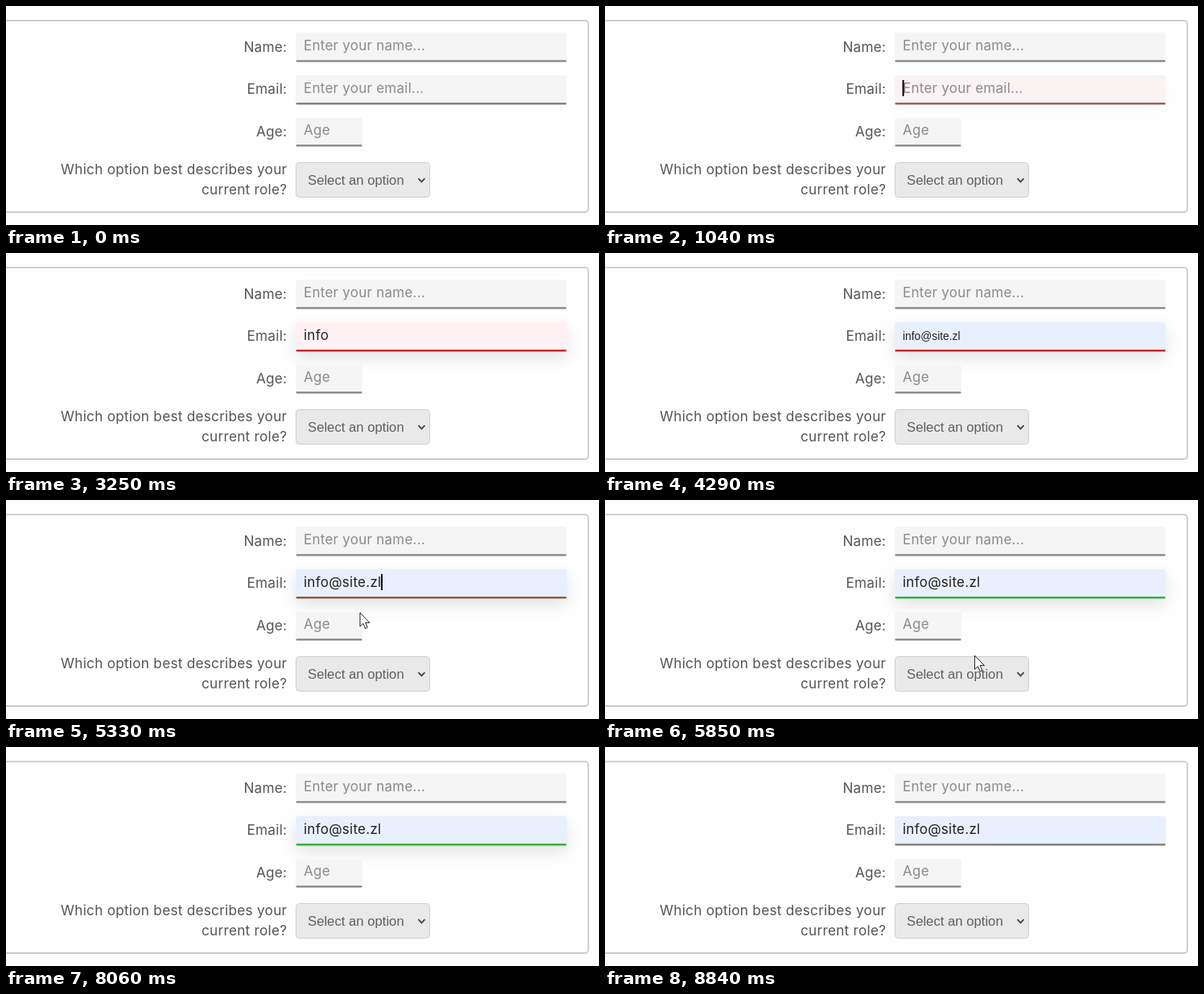
Write an HTML page that moves like this. It is 737x272 px and loops after 8.97 s.

```html
<!DOCTYPE html>
<html lang="en">
<head>
<meta charset="utf-8">
<title>Form validation</title>
<style>
  html, body { margin: 0; width: 100%; height: 100%; overflow: hidden; background: #fefefe; }
  svg { position: absolute; left: 0; top: 0; }
  text { font: 17px Montserrat, Inter, sans-serif; letter-spacing: .015em; fill: #555; }
  .field { fill: #f5f5f5; }
  .line { fill: #848484; }
  .label { font-size: 17.2px; text-anchor: end; }
  .hint { fill: #8a8a8a; }
  .system { font: 16.7px "Liberation Sans", Arial, sans-serif; letter-spacing: 0; fill: #606060; }
  #value { fill: #222; }
  #value.system { font-size: 13.8px; }
</style>
</head>
<body>
<svg width="737" height="272">
  <rect x="-10" y="18.2" width="733.7" height="237.8" rx="4" fill="none" stroke="#cacaca" stroke-width="1.8"/>

  <rect class="field" x="360" y="33" width="337" height="36.4" rx="3"/>
  <rect class="line" x="360.5" y="67.2" width="336" height="2.2" rx="1"/>
  <rect class="field" id="email" x="360" y="86" width="337" height="36.4" rx="3"/>
  <rect class="line" id="emailLine" x="360.5" y="119.9" width="336" height="2.5" rx="1"/>
  <rect class="field" x="360" y="139" width="83" height="35.4" rx="3"/>
  <rect class="line" x="360.5" y="172.2" width="82" height="2.2" rx="1"/>
  <rect x="360.5" y="194.5" width="166" height="43" rx="4" fill="#e9e9e9" stroke="#cfcfcf"/>
  <path d="M512.5 214.2l4 4.2 4-4.2" fill="none" stroke="#444" stroke-width="1.8"/>

  <text class="label" x="349.3" y="57">Name:</text>
  <text class="label" x="349.3" y="109">Email:</text>
  <text class="label" x="349.3" y="162">Age:</text>
  <text class="label" x="349.3" y="209">Which option best describes your</text>
  <text class="label" x="349.3" y="234">current role?</text>
  <text class="hint" x="370" y="55">Enter your name...</text>
  <text class="hint" id="emailHint" x="370" y="108">Enter your email...</text>
  <text class="hint" x="370" y="160">Age</text>
  <text class="system" x="375" y="222">Select an option</text>
  <text id="value" x="370" y="108"></text>
  <rect id="caret" y="92" width="2" height="20"/>
  <path id="pointer" d="M0 0V17L4 13.5 6.6 19.7 9.3 18.5 6.7 12.4H12Z" fill="#fff" stroke="#222"/>
</svg>
<script>
const LOOP = 8970, STEP = 130, FADE = 300;
const ADDRESS = "info@site.zl";
const KEY_TIMES = [1950, 2210, 2470, 2600];
const FOCUS = 1040, PREVIEW = 4030, ACCEPT = 5330, BLUR = 8840;
const CARET_ON = [[FOCUS, 1560], [1950, 3250], [3770, PREVIEW], [ACCEPT, 5850],
                  [6370, 6890], [7540, 8060], [8580, BLUR]];
// Pointer paths: time, x, y
const PATHS = [
  [[260, 484, 212], [520, 452, 128]],
  [[ACCEPT, 440, 140], [5850, 459.5, 193.2], [5980, 466, 222]]
];
const GRAY = [132, 132, 132], RED = [203, 42, 48], GREEN = [54, 176, 60];
const PLAIN = [245, 245, 245], PINK = [255, 241, 243], BLUE = [232, 240, 254];

const [email, emailLine, emailHint, value, caret, pointer] =
  ["email", "emailLine", "emailHint", "value", "caret", "pointer"].map(id => document.getElementById(id));

const mix = (a, b, p) => a.map((v, i) => v + (b[i] - v) * p);
const rgb = c => `rgb(${c.map(Math.round)})`;
const show = (el, on) => el.style.display = on ? "" : "none";
// Each transition begins shortly before its first visible step.
const fade = (t, start) => Math.min(1, Math.max(0, (t - start + 120) / FADE));

function pointerAt(t) {
  const path = PATHS.find(p => t >= p[0][0] && t <= p[p.length - 1][0]);
  if (!path) return null;
  const i = Math.max(1, path.findIndex(k => k[0] >= t));
  const [a, b] = [path[i - 1], path[i]];
  return mix(a, b, (t - a[0]) / (b[0] - a[0])).slice(1);
}

function drawField(t) {
  const focused = t < BLUR ? fade(t, FOCUS) : 0;
  const status = mix(RED, GREEN, fade(t, ACCEPT));
  const fill = mix(mix(PLAIN, PINK, fade(t, FOCUS)), BLUE, fade(t, PREVIEW));
  email.style.fill = rgb(fill);
  email.style.filter = focused ? `drop-shadow(0 8px 10px rgba(0,0,0,${.1 * focused ** 2}))` : "none";
  emailLine.style.fill = rgb(mix(GRAY, status, focused));
}

function drawText(t) {
  const typed = t >= PREVIEW ? ADDRESS.length : KEY_TIMES.filter(k => t >= k).length;
  value.textContent = ADDRESS.slice(0, typed);
  value.classList.toggle("system", t >= PREVIEW && t < ACCEPT);
  show(emailHint, !typed);
  show(caret, CARET_ON.some(([from, to]) => t >= from && t < to));
  caret.setAttribute("x", 369.6 + (typed ? value.getComputedTextLength() : 0));
}

function draw(now) {
  const t = Math.floor(now % LOOP / STEP) * STEP;
  drawField(t);
  drawText(t);
  const at = pointerAt(t);
  show(pointer, at);
  if (at) pointer.setAttribute("transform", `translate(${at})`);
}

const start = performance.now();
function tick() {
  draw(performance.now() - start);
  requestAnimationFrame(tick);
}
tick();
</script>
</body>
</html>
```
